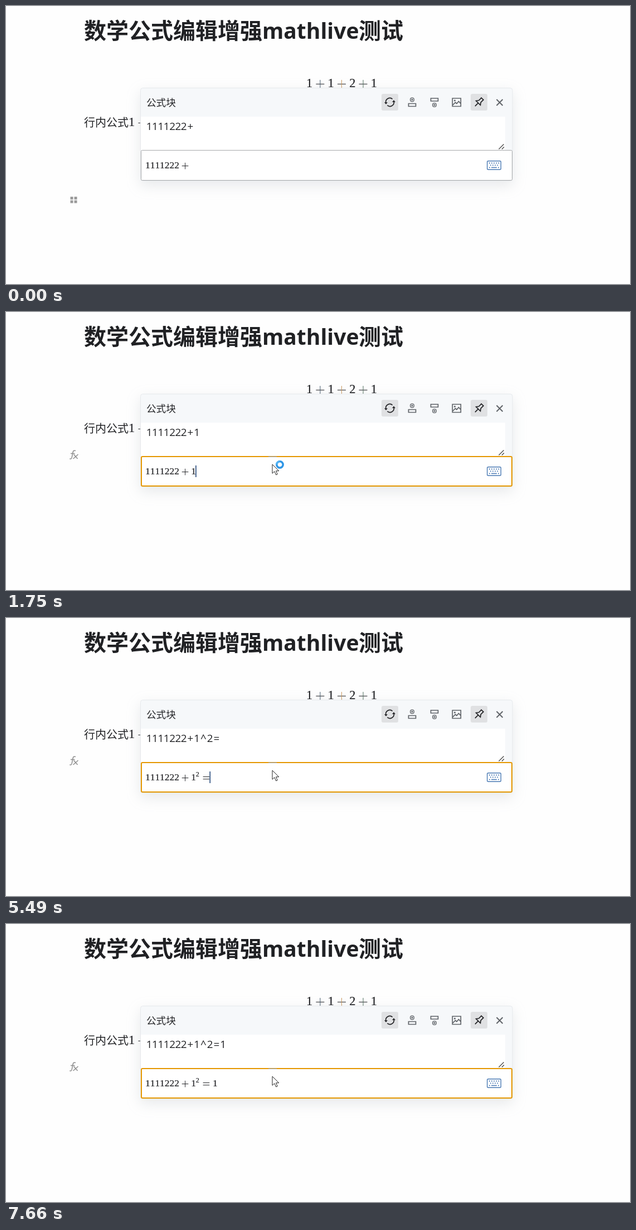
An HTML page for the animation above (8 s loop, 1120 px wide and 500 px high).

```html
<!DOCTYPE html>
<html lang="zh">
<meta charset="utf-8">
<style>
html, body { margin: 0; width: 100%; height: 100%; overflow: hidden; background: #fefefe }
svg { display: block }
text { font-family: 'Noto Sans CJK SC', 'Noto Sans CJK', sans-serif; fill: #202124 }
.latin { font-family: 'Open Sans', 'Noto Sans', sans-serif }
.math { font-family: 'Liberation Serif', serif; text-anchor: middle; stroke: #202124; stroke-width: .2 }
.line { fill: none; stroke: #5f6368; stroke-width: 1.7 }
.thin { stroke-width: 1.3 }
.dark { stroke: #202124 }
.blue { stroke: #4a7ab4; stroke-width: 1.4 }
</style>
<svg width="1120" height="500" viewBox="0 0 1120 500">
  <g font-size="40" font-weight="700">
    <text x="140" y="59">数学公式编辑增强</text>
    <text class="latin" x="460" y="59" font-size="39">mathlive</text>
    <text x="633" y="59">测试</text>
  </g>
  <text x="140" y="216.5" font-size="20">行内公式</text>
  <g id="page"></g>

  <path id="dots" fill="#9a9a9a"
    d="M115.5 343h5v5h-5zM122.5 343h5v5h-5zM115.5 349.5h5v5h-5zM122.5 349.5h5v5h-5z"/>
  <path id="fx" class="line" style="stroke:#8e8e8e;stroke-width:1.5"
    d="M125 249.5c-3-1-4.5 0-5 3l-1.7 8.5c-.5 3-1.6 3.5-4 3M116 254.5h7.5M121.5 256l7 8M129.5 256l-9 8"/>

  <rect x="241.5" y="147.5" width="667.5" height="167" rx="4" fill="#f6f8fa" stroke="#e6e9ec"
    style="filter:drop-shadow(0 8px 12px rgba(140,149,159,.2))"/>
  <text x="252" y="180.3" font-size="17.6">公式块</text>
  <path d="M242 199h654v60H242z" fill="#fff"/>
  <path class="line thin" style="stroke:#444" d="M884.5 257.5l9-9M890 257.5l4-4"/>

  <g fill="#e0e1e3">
    <rect x="674" y="158" width="30" height="30" rx="3"/>
    <rect x="834" y="158" width="30" height="30" rx="3"/>
  </g>
  <g class="line dark" transform="translate(689 173)">
    <path d="M-7.3 1A7.3 7.3 0 0 1 4.6-5.7M7.3-1A7.3 7.3 0 0 1-4.6 5.7"/>
    <path d="M-10 .3h6l-3 3.4zM10-.3h-6l3-3.4z" fill="#202124" stroke="none"/>
  </g>
  <g class="line">
    <path d="M722.5 175.5h13v5h-13zM762.5 166h13v5h-13z"/>
    <g class="thin">
      <circle cx="729" cy="168.5" r="3.4"/>
      <circle cx="769" cy="178" r="3.4"/>
      <path d="M729 166.7v3.6M727.2 168.5h3.6M769 176.2v3.6M767.2 178h3.6"/>
    </g>
    <path d="M801.3 166h15v14.5h-15zM802 178l4.5-4.5 2.5 2 3.5-4 4 4.5"/>
    <circle cx="805.5" cy="170" r=".7"/>
    <path d="M880.5 168l11 11M891.5 168l-11 11" stroke-width="2"/>
  </g>
  <path class="line dark" transform="translate(849 173) rotate(45)"
    d="M-3.5-8.5h7M-2.5-8v6l-3 4h11l-3-4v-6M0 2v8"/>

  <rect id="field" fill="#fff"/>
  <path id="edge" d="M471 260.3h15" stroke="#a9a294" stroke-width="1.4"/>
  <g class="line blue">
    <rect x="863.7" y="278.7" width="24.6" height="15.6" rx="2"/>
    <path d="M867 282.5h19M869 286.3h16" stroke-width="1.8" stroke-dasharray="1.8 2.3"/>
    <path d="M867 290.5h2M871 290.5h10M883 290.5h2"/>
  </g>

  <g id="typed"></g>
  <path id="caret" stroke="#44638e" stroke-width="1.9"/>
  <g id="pointer">
    <circle id="glow" r="15" fill="#ffff54" opacity=".8"/>
    <path d="M0 0V16.3L3.9 12.7l2.7 6.2 2.6-1.1-2.6-6H11.8z" fill="#fff" stroke="#222"/>
    <g id="busy" transform="translate(13.5 .5)" fill="none" stroke-width="3.6">
      <circle r="5.7" stroke="#2f96e6"/>
      <path id="spin" d="M0-5.7A5.7 5.7 0 0 1 5.7 0" stroke="#52b2f4"/>
    </g>
  </g>
</svg>
<script>
const $ = id => document.getElementById(id);
const show = (id, on) => $(id).style.display = on ? '' : 'none';

// Lays out digits, + and = with TeX spacing; returns the markup and the end position.
function math(x, y, em, source, plusColors = []) {
  let out = '', plus = 0;
  for (let i = 0; i < source.length; i++) {
    const c = source[i];
    if (c === '+' || c === '=') {
      const gap = (c === '+' ? .222 : .278) * em, r = .335 * em, mid = y - .25 * em;
      const cx = x + gap + .389 * em;
      const bar = dy => `M${cx - r} ${mid + dy}h${2 * r}`;
      out += `<path class="line dark" style="stroke-width:1" d="${c === '+' ? bar(0) : bar(-.12 * em) + bar(.12 * em)}"/>`;
      if (c === '+') out += `<path stroke="${plusColors[plus++] || '#303236'}" d="M${cx} ${mid - r}v${2 * r}"/>`;
      x += gap + .778 * em + (i < source.length - 1 ? gap : 0);
    } else {
      const sup = c === '^', size = sup ? .7 * em : em;
      out += `<text class="math" x="${x + size / 4}" y="${sup ? y - .38 * em : y}" font-size="${size}">${sup ? source[++i] : c}</text>`;
      x += size / 2 + (sup ? .05 * em : 0);
    }
  }
  return { out, end: x };
}

function plain(x, y, source) {
  const xs = [...source].map(c => {
    const w = /\d/.test(c) ? 10.35 : 13.1;
    x += w;
    return x - w / 2;
  });
  return `<text class="latin" x="${xs.join(' ')}" y="${y}" font-size="18.9" text-anchor="middle">${source}</text>`;
}

$('page').innerHTML = math(539, 146, 22.4, '1+1+2+1', ['#46586a', '#c9975c', '#4f6e5c']).out
  + math(220, 216, 22.4, '1+').out;

const edits = [
  [0, '1111222+'], [805, '1111222+'], [1625, '1111222+1'], [3825, '1111222+1^2'],
  [5485, '1111222+1^2='], [7125, '1111222+1^2=1']
];
const path = [
  [130, 1024, 483], [200, 930, 430], [270, 760, 342], [330, 605, 294], [400, 520, 286],
  [540, 515, 285], [740, 480, 275], [945, 480, 274.5], [1210, 478, 274]
];

function pointerAt(t) {
  const i = path.findIndex(p => p[0] > t);
  if (i < 0) return path.at(-1).slice(1);
  if (!i) return path[0].slice(1);
  const a = path[i - 1], b = path[i], k = (t - a[0]) / (b[0] - a[0]);
  return [1, 2].map(n => a[n] + (b[n] - a[n]) * k);
}

let shown;
function draw(now) {
  const t = now % 8000;
  const step = Math.floor((t + 5) / 67.1) * 67.1;
  const focused = t >= 805;
  const edit = edits.findLast(e => t >= e[0]);

  if (edit !== shown) {
    shown = edit;
    const formula = math(250, 292, 17.4, edit[1]);
    $('typed').innerHTML = plain(252, 223, edit[1]) + formula.out;
    $('caret').setAttribute('d', `M${formula.end} 276v21`);
    const inset = focused ? 1 : .5;
    const box = { x: 242 + inset, y: 259 + inset, width: 667 - 2 * inset, height: 55 - 2 * inset,
      rx: 2, stroke: focused ? '#e59700' : '#a6a8aa', 'stroke-width': 2 * inset };
    for (const k in box) $('field').setAttribute(k, box[k]);
  }

  show('caret', focused && Math.floor((t - edit[0]) / 530) % 2 === 0);
  show('dots', t < 265);
  show('fx', t >= 265);
  show('pointer', t >= 125);
  show('glow', t >= 735 && t < 945);
  show('edge', t >= 945);
  show('busy', t >= 1415 && t < 2685 || t >= 5955 && t < 7655);
  $('pointer').setAttribute('transform', `translate(${pointerAt(step)})`);
  $('spin').setAttribute('transform', `rotate(${step * .36})`);
  requestAnimationFrame(draw);
}
draw(performance.now());
</script>
</html>
```
